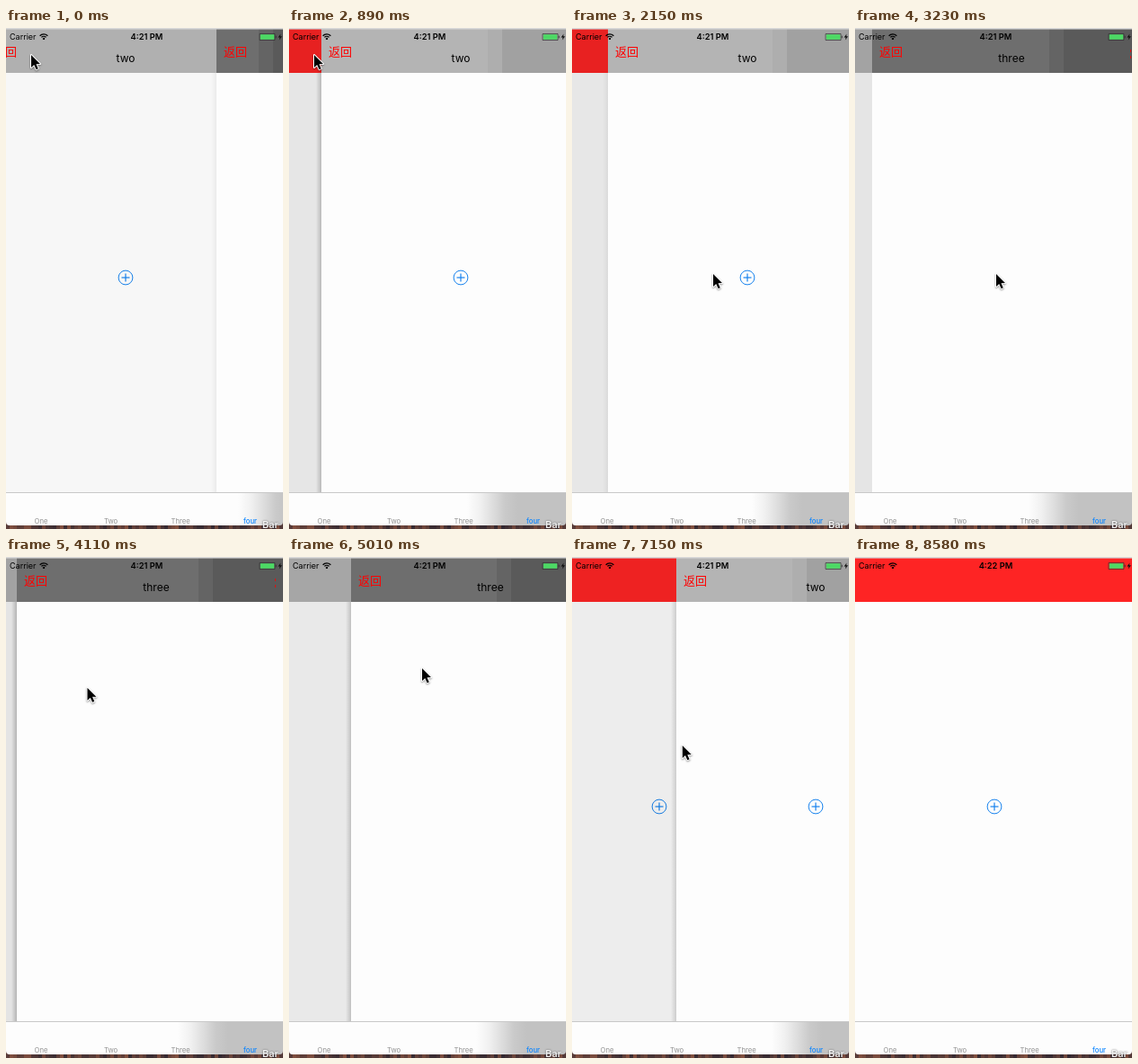
An HTML page with a canvas that plays this animation: 308 by 558 pixels, repeating every 9120 ms.

```html
<!DOCTYPE html>
<html lang="en">
<head>
<meta charset="utf-8">
<style>
html, body { margin: 0; height: 100%; overflow: hidden; background: #fff; }
canvas { display: block; }
</style>
</head>
<body>
<canvas id="stage" width="308" height="558"></canvas>
<script>
const c = document.getElementById('stage').getContext('2d');
const W = 308, LOOP = 9120, STEP = 178.8;
const SANS = 'Inter, Roboto, sans-serif';
const CJK = '"Noto Sans CJK SC", "Noto Sans CJK", sans-serif';

const pages = {
  one: { bar: ['#fe2424', '#fe2424', '#fe2424'], plus: true },
  two: { bar: ['#b4b4b4', '#aeaeae', '#a1a1a1'], title: 'two', plus: true },
  three: { bar: ['#6e6e6e', '#646464', '#5a5a5a'], title: 'three', mark: true }
};

// Pointer path: step, x, y
const path = [[0, 28, 30], [8, 28, 30], [10, 157, 274], [20, 157, 274], [22, 79, 150],
  [28, 148, 124], [31, 260, 130], [34, 10, 208], [35, 7, 204], [37, 7, 204],
  [42, 200, 214], [44, 200, 230], [48, 240, 575], [51, 240, 575]];

function pointer(step) {
  const i = Math.max(1, path.findIndex(p => p[0] >= step));
  const [a, ax, ay] = path[i - 1], [b, bx, by] = path[i];
  const k = (step - a) / (b - a);
  return [ax + (bx - ax) * k, ay + (by - ay) * k];
}

// Remaining distance of a critically damped spring
function rest(ms) {
  const w = Math.max(0, ms) * 0.015;
  return (1 + w) * Math.exp(-w);
}

// Front page, back page, left edge of the front page, shadow strength
function scene(step) {
  const t = step * STEP;
  const pop = (start, from = 0) => W - (W - from) * rest(t - start);
  const push = start => W * rest(t - start);
  const cx = pointer(step)[0];
  const view = (front, back, x, shade = 1 - x / W) => ({ front, back, x, shade });
  if (step < 5) return view('three', 'two', pop(-183));
  if (step < 11) return view('two', 'one', pop(855));
  if (step < 17) return view('two', 'one', push(1909), 0.25);
  if (step < 22) return view('three', 'two', push(2921), 0);
  if (step <= 31) return view('three', 'two', cx - 79);
  if (step < 37) return view('three', 'two', pop(31 * STEP, 181));
  if (step <= 42) return view('two', 'one', cx - 7);
  return view('two', 'one', pop(42 * STEP, 193));
}

function rect(x, y, w, h, color) {
  c.fillStyle = color;
  c.fillRect(x, y, w, h);
}

function text(str, x, y, font, color, align = 'center') {
  c.font = font;
  c.fillStyle = color;
  c.textAlign = align;
  c.fillText(str, x, y);
}

function line(points, color, width) {
  c.beginPath();
  points.forEach(([x, y], i) => i ? c.lineTo(x, y) : c.moveTo(x, y));
  c.strokeStyle = color;
  c.lineWidth = width;
  c.stroke();
}

function page(name, x, edge) {
  const p = pages[name];
  rect(x, 50, W, 467, '#fdfdfd');
  rect(x, 1, W, 49, p.bar[0]);
  if (edge) {
    const from = Math.max(x, edge - 5);
    rect(from, 1, W - from, 49, p.bar[1]);
    rect(Math.max(x, edge + 11), 1, W, 49, p.bar[2]);
  }
  if (p.title) {
    text('返回', x + 8, 31, '13px ' + CJK, '#f00', 'left');
    text(p.title, x + 155, 38, '12px ' + SANS, '#000');
  }
  if (p.mark) {
    rect(x + 287, 24, 1, 3, '#e01010');
    rect(x + 287, 31, 1, 3, '#e01010');
  }
  if (p.plus) {
    const px = x + 155, py = 278;
    c.beginPath();
    c.arc(px, py, 7.9, 0, 7);
    c.strokeStyle = '#1682ee';
    c.lineWidth = 1;
    c.stroke();
    line([[px - 4.5, py], [px + 4.5, py]], '#1682ee', 1.2);
    line([[px, py - 4.5], [px, py + 4.5]], '#1682ee', 1.2);
  }
}

function shadow(x, strength) {
  const g = c.createLinearGradient(x - 6, 0, x, 0);
  g.addColorStop(0, 'rgba(0,0,0,0)');
  g.addColorStop(1, `rgba(0,0,0,${0.22 * strength})`);
  rect(x - 6, 50, 6, 467, g);
}

function statusBar(step) {
  rect(0, 0, W, 1.5, '#d8d8d8');
  text('Carrier', 4, 13, '9px ' + SANS, '#000', 'left');
  text(step < 45 ? '4:21 PM' : '4:22 PM', 156.5, 13, '600 9.3px ' + SANS, '#000');
  c.strokeStyle = c.fillStyle = '#000';
  c.lineWidth = 1.3;
  for (const r of [3.5, 6]) {
    c.beginPath();
    c.arc(42, 12.8, r, -Math.PI * 0.76, -Math.PI * 0.24);
    c.stroke();
  }
  c.beginPath();
  c.arc(42, 11.9, 1.2, 0, 7);
  c.fill();
  c.strokeStyle = '#333';
  c.lineWidth = 0.7;
  c.strokeRect(282, 6.5, 17, 7);
  rect(282.8, 7.2, 15.4, 5.6, '#4cd964');
  rect(299.6, 8.7, 1, 2.6, '#333');
  c.beginPath();
  for (const [x, y] of [[305.5, 6.5], [302.5, 10.5], [304.5, 10.5], [303.8, 13.5], [307, 9.3], [305, 9.3]]) c.lineTo(x, y);
  c.fillStyle = '#111';
  c.fill();
}

function tabBar(edge) {
  let fill = '#fdfdfd';
  if (edge) {
    fill = c.createLinearGradient(edge - 28, 0, edge + 28, 0);
    ['#fdfdfd', '#f1f1f1', '#dedede', '#cacaca', '#c2c2c2']
      .forEach((color, i) => fill.addColorStop(i / 4, color));
  }
  let seed = 7;
  for (let x = 0; x < W; x += 4) {
    seed = seed * 73 % 1009;
    const v = seed / 1009;
    rect(x, 550, 4, 8, `rgb(${45 + 85 * v}, ${38 + 42 * v}, ${48 + 15 * v})`);
  }
  c.beginPath();
  c.roundRect(0, 517, W, 37, [0, 0, 4, 4]);
  c.fillStyle = fill;
  c.fill();
  rect(0, 517, W, 1, '#c8c8c8');
  ['One', 'Two', 'Three'].forEach((s, i) =>
    text(s, 39 + i * 77.6, 552, '7.7px ' + SANS, '#929292'));
  text('four', 271.5, 552, '500 7.7px ' + SANS, '#0a84ff');
  c.shadowColor = 'rgba(0,0,0,.6)';
  c.shadowBlur = 2;
  text('Bar', 294, 557, '600 11px ' + SANS, '#f4f4f4');
  c.shadowBlur = 0;
  c.shadowColor = 'transparent';
}

function arrow(x, y) {
  c.beginPath();
  for (const [dx, dy] of [[0, 0], [0, 14], [3.2, 11], [5.6, 16.2], [7.8, 15.2], [5.5, 10.2], [10, 10]]) c.lineTo(x + dx, y + dy);
  c.closePath();
  c.lineJoin = 'round';
  c.lineWidth = 2;
  c.strokeStyle = '#fff';
  c.shadowColor = 'rgba(0,0,0,.4)';
  c.shadowBlur = 2;
  c.shadowOffsetY = 1;
  c.stroke();
  c.shadowColor = 'transparent';
  c.shadowBlur = c.shadowOffsetY = 0;
  c.fillStyle = '#000';
  c.fill();
}

function draw(now) {
  const step = Math.min(50, Math.floor((now % LOOP + 12) / STEP));
  const { front, back, x: left, shade } = scene(step);
  const x = Math.round(left);
  const moving = x > 0 && x < W - 1;
  const edge = moving ? Math.round(W * 0.7 + x * 0.3) : 0;
  rect(0, 0, W, 558, '#fdfdfd');
  if (moving) {
    page(back, edge - W);
    rect(0, 1, W, 516, `rgba(0,0,0,${0.1 * (1 - x / W)})`);
    shadow(x, shade);
    page(front, x, edge);
  } else {
    page(x <= 0 ? front : back, 0);
  }
  tabBar(edge);
  statusBar(step);
  arrow(...pointer(step));
}

function tick() {
  draw(performance.now());
  requestAnimationFrame(tick);
}
tick();
</script>
</body>
</html>
```
